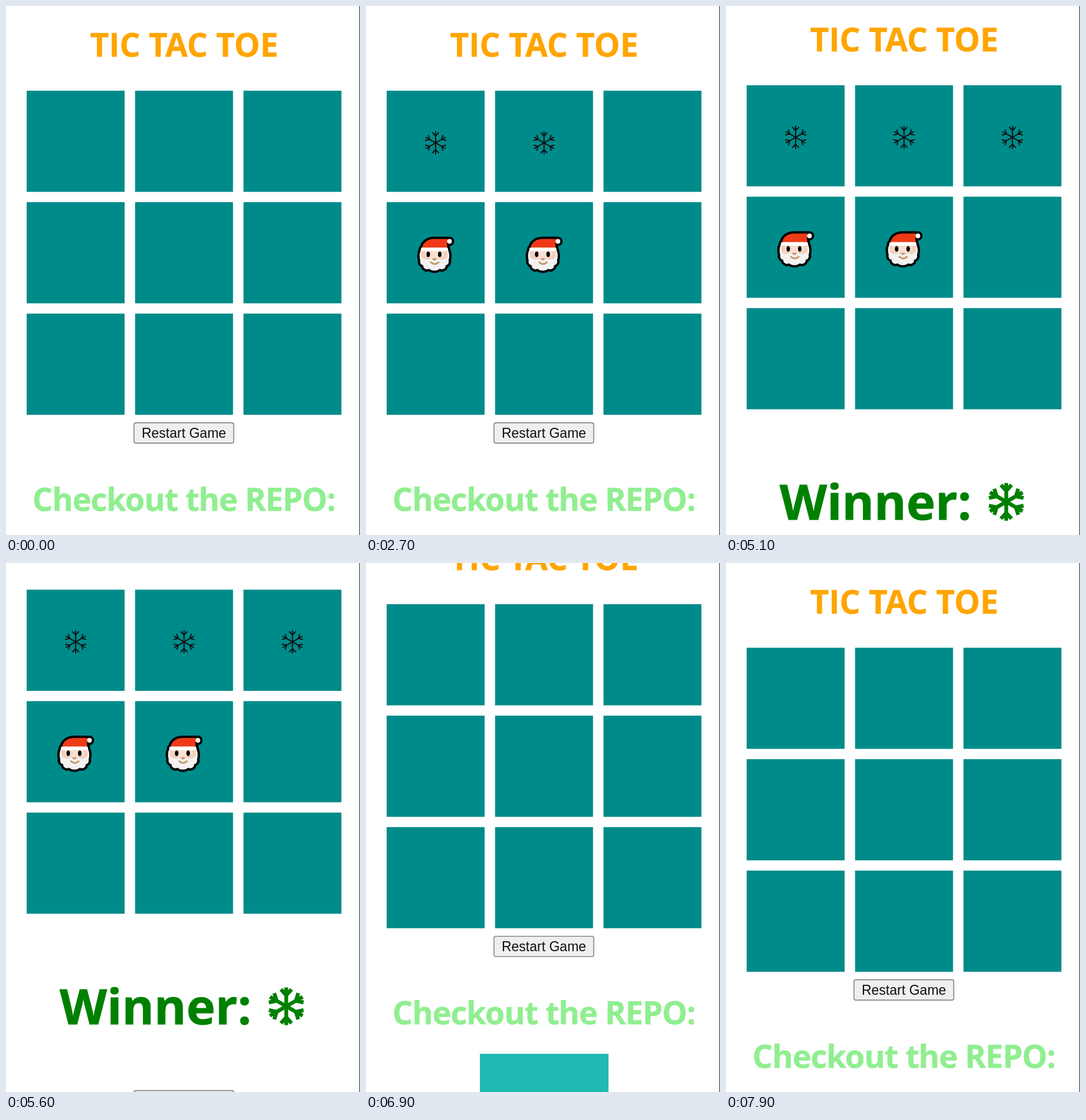
An HTML page for the animation above (8 s loop, 600 by 898 pixels).

```html
<!DOCTYPE html>
<html lang="en">
<head>
<meta charset="utf-8">
<title>Tic Tac Toe</title>
<style>
  html, body { margin: 0; width: 100%; height: 100%; overflow: hidden; background: #fff; }
  svg { display: block; }
  text { font: 700 55px "Open Sans", "Noto Sans", sans-serif; }
  .mid { text-anchor: middle; }
  #button text { font: 23px "Liberation Sans", Arial, sans-serif; }
</style>
</head>
<body>
<svg width="600" height="898" viewBox="0 0 600 898">
  <defs>
    <path id="arm" d="M0 0V-19.5M-5.5 -17.5L0 -11.5L5.5 -17.5"/>
    <g id="flake" fill="none">
      <use href="#arm"/>
      <use href="#arm" transform="rotate(60)"/>
      <use href="#arm" transform="rotate(120)"/>
      <use href="#arm" transform="rotate(180)"/>
      <use href="#arm" transform="rotate(240)"/>
      <use href="#arm" transform="rotate(300)"/>
    </g>
    <path id="hat" d="M60 79C61 68 70 62.500 81 62.500H103V67C101 69 103 74 103 79Z"/>
    <rect id="brim" x="58" y="77" width="46" height="6" rx="3"/>
    <circle id="bobble" cx="106.500" cy="66.500" r="4"/>
    <path id="beard" d="M58 81H104A26 26 0 0 1 105 99A6 6 0 0 1 100 107A6.500 6.500 0 0 1 90 113A14 14 0 0 1 72 113A6.500 6.500 0 0 1 62 107A6 6 0 0 1 57 99A26 26 0 0 1 58 81Z"/>
    <g id="santa">
      <g stroke="#000" stroke-width="8" stroke-linejoin="round">
        <use href="#hat"/><use href="#brim"/><use href="#bobble"/><use href="#beard"/>
      </g>
      <use href="#beard" fill="#f3f2f2"/>
      <path d="M59 82H103V93Q99 98 92 97Q86 95 81 98Q76 95 70 97Q63 98 59 93Z" fill="#f4d0bd"/>
      <path d="M65 82H97V90Q90 96 81 96Q72 96 65 90Z" fill="#f9dfd2"/>
      <use href="#hat" fill="#f03a17"/>
      <use href="#brim" fill="#fff"/>
      <use href="#bobble" fill="#fff"/>
      <ellipse cx="70.500" cy="88.500" rx="3" ry="4.800"/>
      <ellipse cx="90" cy="88.500" rx="3" ry="4.800"/>
      <path d="M77 96Q81 94 85 96Q84 99 81 99Q78 99 77 96Z" fill="#c89b7b"/>
      <path d="M75 102Q82 108 88 102" fill="none" stroke="#c39a6b" stroke-width="3" stroke-linecap="round"/>
    </g>
  </defs>

  <g id="page">
    <text class="mid" x="302" y="86" fill="#ffa500" stroke="#ffa500" stroke-width=".5">TIC TAC TOE</text>
    <g id="board"></g>
    <g id="button">
      <rect x="217" y="707.500" width="169" height="34.500" rx="3" fill="#efefef" stroke="#767676" stroke-width="1.400"/>
      <text class="mid" x="301.500" y="733" fill="#111">Restart Game</text>
    </g>
    <g id="footer">
      <text class="mid" x="301.500" y="857" fill="#90ee90" stroke="#90ee90" stroke-width=".5" style="font-size:54px;letter-spacing:-1px">Checkout the REPO:</text>
      <rect x="193" y="907" width="218" height="218" fill="#1fbab4"/>
    </g>
    <g id="winner">
      <text x="91" y="881" fill="#008000" stroke="#008000" stroke-width=".8" style="font-size:83px">Winner:</text>
      <use href="#flake" transform="translate(475 851) scale(1.640)" stroke="#008000" stroke-width="4"/>
    </g>
  </g>
  <rect x="599" width="1" height="898" fill="#222"/>
</svg>
<script>
const LOOP = 8000, WIN = 2800, RESET = 6600, MAX_SCROLL = 98.5;
const $ = id => document.getElementById(id);

// Board cell and time of each move, the two players alternating
const moves = [[0, 500], [3, 1000], [1, 1700], [4, 2200], [2, WIN]];

const cellPos = i => `translate(${35 + i % 3 * 183.75} ${143.8 + Math.floor(i / 3) * 189.2})`;

let board = "";
for (let i = 0; i < 9; i++)
  board += `<rect width="166" height="171.7" fill="#008b8b" transform="${cellPos(i)}"/>`;
moves.forEach(([cell], n) => {
  const mark = n % 2
    ? '<use href="#santa"/>'
    : '<use href="#flake" x="83" y="88.5" stroke="#111" stroke-width="2"/>';
  board += `<g class="mark" transform="${cellPos(cell)}">${mark}</g>`;
});
$("board").innerHTML = board;
const marks = document.querySelectorAll(".mark");

function ease(t, start, length) {
  const p = Math.min(1, Math.max(0, (t - start) / length));
  return p * p * (3 - 2 * p);
}

const show = (el, on) => el.setAttribute("display", on ? "inline" : "none");

function draw() {
  const t = performance.now() % LOOP;
  const won = t >= WIN && t < RESET;
  const scroll = MAX_SCROLL * (ease(t, 5044, 300) - ease(t, 6790, 340));

  $("page").setAttribute("transform", `translate(0 ${-scroll})`);
  $("button").setAttribute("transform", `translate(0 ${won ? 286.5 : 0})`);
  show($("winner"), won);
  show($("footer"), !won);
  moves.forEach(([, time], n) => show(marks[n], t >= time && t < RESET));
  requestAnimationFrame(draw);
}
draw();
</script>
</body>
</html>
```
